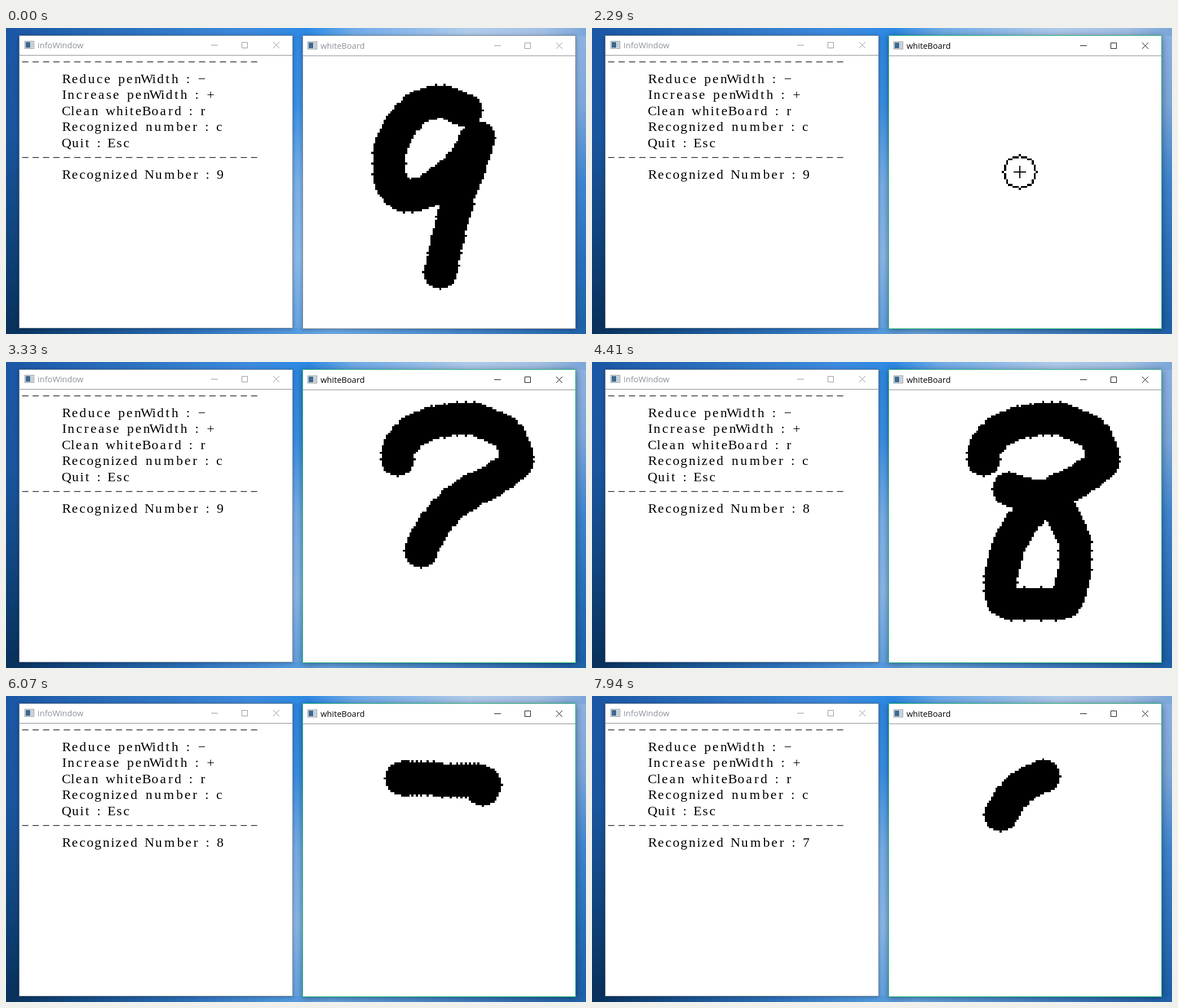
Recreate the animation shown at these times as an HTML page with a canvas. Size 1029 px wide and 544 px high, loop 8000 ms.

```html
<!DOCTYPE html>
<html lang="en">
<head>
<meta charset="utf-8">
<title>Digit whiteboard</title>
<style>
html, body { margin: 0; width: 100%; height: 100%; overflow: hidden; }
body {
  position: relative;
  background:
    linear-gradient(90deg, #1a56a4, #2f76c4 25%, #3d8ade 42%, #2d8ae4 52%, #6fabe8 60%, #b0cbea 80%, #a3c0e4 92%, #7ba6da) 0 0 / 100% 14px no-repeat,
    linear-gradient(90deg, #08305a, #17508c 15%, #2c70b8 32%, #4f97dc 48%, #6aa8e2 56%, #4a8bce 75%, #1f62a8) 0 100% / 100% 11px no-repeat,
    linear-gradient(#1b58a6, #1a559e 35%, #114680 65%, #08305a) 0 0 / 24px 100% no-repeat,
    linear-gradient(#2d86e0, #3b90e4 25%, #78b0e8 50%, #8bbaea 75%, #62a2e0) 508px 0 / 19px 100% no-repeat,
    linear-gradient(#8fb3e0, #7ca6d9 25%, #3f84cc 50%, #2a70b8 75%, #1d5fa4) 100% 0 / 19px 100% no-repeat,
    #3d84cc;
}
.win {
  position: absolute; box-sizing: border-box; width: 486px; height: 521px;
  background: #fff; border: 1px solid #828a92; box-shadow: 0 1px 7px rgba(0, 20, 50, .35);
}
#info { left: 23px; top: 13px; }
#board { left: 526px; top: 13px; width: 485px; height: 522px; }
#board.active { border-color: #22c070; box-shadow: 0 2px 12px rgba(0, 20, 50, .5); }
svg, canvas { position: absolute; left: 0; top: 0; }
.bar { color: #8c9299; }
.bar.active { color: #000; }
.bar text { font: 14.6px "Open Sans", "Noto Sans", sans-serif; fill: currentColor; }
.bar path { stroke: currentColor; fill: none; }
.list text { font: 24px "Liberation Serif", "Times New Roman", serif; text-anchor: middle; white-space: pre; }
</style>
</head>
<body>
<div class="win" id="info"></div>
<div class="win" id="board"></div>
<svg id="ui" width="1029" height="544"></svg>
<canvas id="pad" width="1029" height="544"></canvas>
<script>
const LOOP = 8000, CELLS = 128, R = 8;
const X0 = 527, Y0 = 50, SX = 483 / CELLS, SY = 484 / CELLS;
const $ = id => document.getElementById(id);
const ui = $('ui'), ctx = $('pad').getContext('2d');

function add(parent, tag, attrs, text) {
  const el = document.createElementNS('http://www.w3.org/2000/svg', tag);
  for (const k in attrs) el.setAttribute(k, attrs[k]);
  if (text) el.textContent = text;
  parent.appendChild(el);
  return el;
}

function titleBar(x, y, title) {
  const g = add(ui, 'g', { class: 'bar', transform: `translate(${x} ${y})` });
  add(g, 'rect', { x: 9.5, y: 10.5, width: 16, height: 13, fill: '#e6eaee', stroke: '#87919b' });
  add(g, 'rect', { x: 11, y: 12, width: 8, height: 10, fill: '#3d6890' });
  add(g, 'rect', { x: 20, y: 12, width: 4, height: 10, fill: '#c3ccd4' });
  add(g, 'text', { x: 32, y: 23 }, title);
  add(g, 'path', { d: 'M340 17.5h12M394.5 12.5h10v10h-10zM450 12l11 11m0 -11l-11 11' });
  add(g, 'path', { d: 'M0 35.5h484', style: 'stroke:#80868c' });
  return g;
}
titleBar(24, 13, 'infoWindow');
const boardBar = titleBar(526, 14, 'whiteBoard');

// Advance widths of the stroke font, in font units
const ADVANCE = {};
Object.entries({ 33: 'm', 26: '−+', 24: 'WwN', 22: 'RBQnuh', 21: 'CEdpb', 20: 'oa987',
  19: 'ceg', 18: 'z', 17: 'rs', 16: ' ', 15: 't', 11: 'il:I' })
  .forEach(([w, chars]) => [...chars].forEach(c => ADVANCE[c] = w * 0.71));

const list = add(ui, 'g', { class: 'list' });
function line(str, x, y) {
  const xs = [...str].map(c => {
    const mid = x + ADVANCE[c] / 2;
    x += ADVANCE[c];
    return mid.toFixed(1);
  });
  return add(list, 'text', { x: xs.join(' '), y }, str);
}
const LEFT = 99.6, RULE = '−'.repeat(23);
line(RULE, 25, 68);
['Reduce penWidth : −', 'Increase penWidth : +', 'Clean whiteBoard : r',
  'Recognized number : c', 'Quit : Esc'].forEach((s, i) => line(s, LEFT, 98 + i * 28.4));
line(RULE, 25, 238);
const RESULT = 'Recognized Number : ';
const result = line(RESULT + '9', LEFT, 268);

// Pen strokes as points on the cell grid
const pts = s => s.split(' ').map(p => p.split(',').map(Number));
const nine = pts('76,25 69,22 62,21 53,24 45,33 41,41 40,50 41,59 47,65 55,64 61,61 69,55 77,46 82,38 77,54 73,63 70,75 66,92 64,101');
const eight = pts('44,32 45,26 51,19 60,15 72,13 80,13 90,17 97,22 100,31 98,35 87,43 80,46 71,52 61,63 57,70 55,75 ' +
  '53,83 52,90 53,98 63,100 78,100 84,96 86,88 87,79 87,71 83,62 79,55 71,50 62,48 56,46');
const seven = pts('46,25 48,25 51,25 55,25 61,25 69,26 74,26 78,26 82,26 85,28 84,30 78,45 73,57 69,70 66,83 64,96 63,104');
const next = pts('72,24 62,29 56,35 52,42');

// start, end, steps, stroke, first and last point reached, cursor from, cursor to
const TRACKS = [
  [0, 0, 1, nine, 18, 18],
  [360, 600, 4, nine, 18, 18, [97, 125], [87, 83]],
  [680, 680, 1, nine, 18, 18],
  [2290, 2290, 1, null, 0, 0, [61, 54], [61, 54]],
  [2550, 2784, 4, null, 0, 0, [58, 49], [44, 32]],
  [2862, 3330, 7, eight, 1, 15],
  [3400, 3950, 8, eight, 17, 29],
  [5190, 5430, 4, null, 0, 0, [56, 46], [46, 25]],
  [5510, 5830, 5, seven, 0, 8],
  [6070, 6220, 3, seven, 10, 16],
  [7080, 7230, 3, seven, 16, 16, [66, 80], [61, 62]],
  [7310, 7780, 7, null, 0, 0, [62, 56], [72, 24]],
  [7860, 7940, 2, next, 0, 3]
];

const mix = (a, b, p) => a + (b - a) * p;

function pointAt(path, u) {
  const i = Math.min(Math.floor(u), path.length - 2), f = u - i;
  const at = k => path[Math.max(0, Math.min(path.length - 1, k))];
  const [a, b, c, d] = [at(i - 1), at(i), at(i + 1), at(i + 2)];
  return [0, 1].map(k => b[k] + f / 2 * (c[k] - a[k] +
    f * (2 * a[k] - 5 * b[k] + 4 * c[k] - d[k] + f * (3 * (b[k] - c[k]) + d[k] - a[k]))));
}

function disc(x, y, rr, put) {
  for (let j = Math.floor(y) - R; j <= y + R + 1; j++)
    for (let i = Math.floor(x) - R; i <= x + R + 1; i++)
      if ((i - x) ** 2 + (j - y) ** 2 <= rr) put(i, j);
}

function cell(i, j) {
  if (i < 0 || j < 0 || i >= CELLS || j >= CELLS) return;
  const x = Math.round(i * SX), y = Math.round(j * SY);
  ctx.fillRect(X0 + x, Y0 + y, Math.round((i + 1) * SX) - x, Math.round((j + 1) * SY) - y);
}

function drawStroke(path, end) {
  const ink = new Set(), put = (i, j) => ink.add(j * CELLS + i);
  for (let n = 0; n <= Math.round(end * 8); n++) {
    const [x, y] = pointAt(path, n / 8);
    disc(x, y, 56, put);
    if (n % 4 === 0) disc(Math.round(x), Math.round(y), R * R, put);
  }
  ink.forEach(k => cell(k % CELLS, Math.floor(k / CELLS)));
}

function drawCursor(x, y) {
  const inside = (i, j) => i * i + j * j <= R * R;
  disc(x, y, R * R, (i, j) => {
    const a = Math.abs(i - x), b = Math.abs(j - y);
    if (!inside(a + 1, b) || !inside(a, b + 1)) cell(i, j);
  });
  const px = Math.round(X0 + (x + .5) * SX), py = Math.round(Y0 + (y + .5) * SY);
  ctx.fillRect(px - 11, py - 1, 22, 2);
  ctx.fillRect(px - 1, py - 11, 2, 22);
}

let shown = '';
function render(t) {
  const n = TRACKS.findLastIndex(tr => t >= tr[0]);
  const [t0, t1, steps, path, u0, u1, from, to] = TRACKS[n];
  const k = steps > 1 ? Math.min(steps - 1, Math.floor((t - t0) / (t1 - t0) * (steps - 1) + 1e-6)) : 0;
  const p = steps > 1 ? k / (steps - 1) : 1;
  const active = t >= 1530, digit = t < 4410 ? '9' : t < 6600 ? '8' : '7';
  const key = [n, k, active, digit].join();
  if (key === shown) return;
  shown = key;
  boardBar.classList.toggle('active', active);
  $('board').classList.toggle('active', active);
  result.textContent = RESULT + digit;
  ctx.clearRect(0, 0, 1029, 544);
  if (path) drawStroke(path, mix(u0, u1, p));
  if (from) drawCursor(Math.round(mix(from[0], to[0], p)), Math.round(mix(from[1], to[1], p)));
}

const start = performance.now();
function tick() {
  render((performance.now() - start) % LOOP);
  requestAnimationFrame(tick);
}
tick();
</script>
</body>
</html>
```
